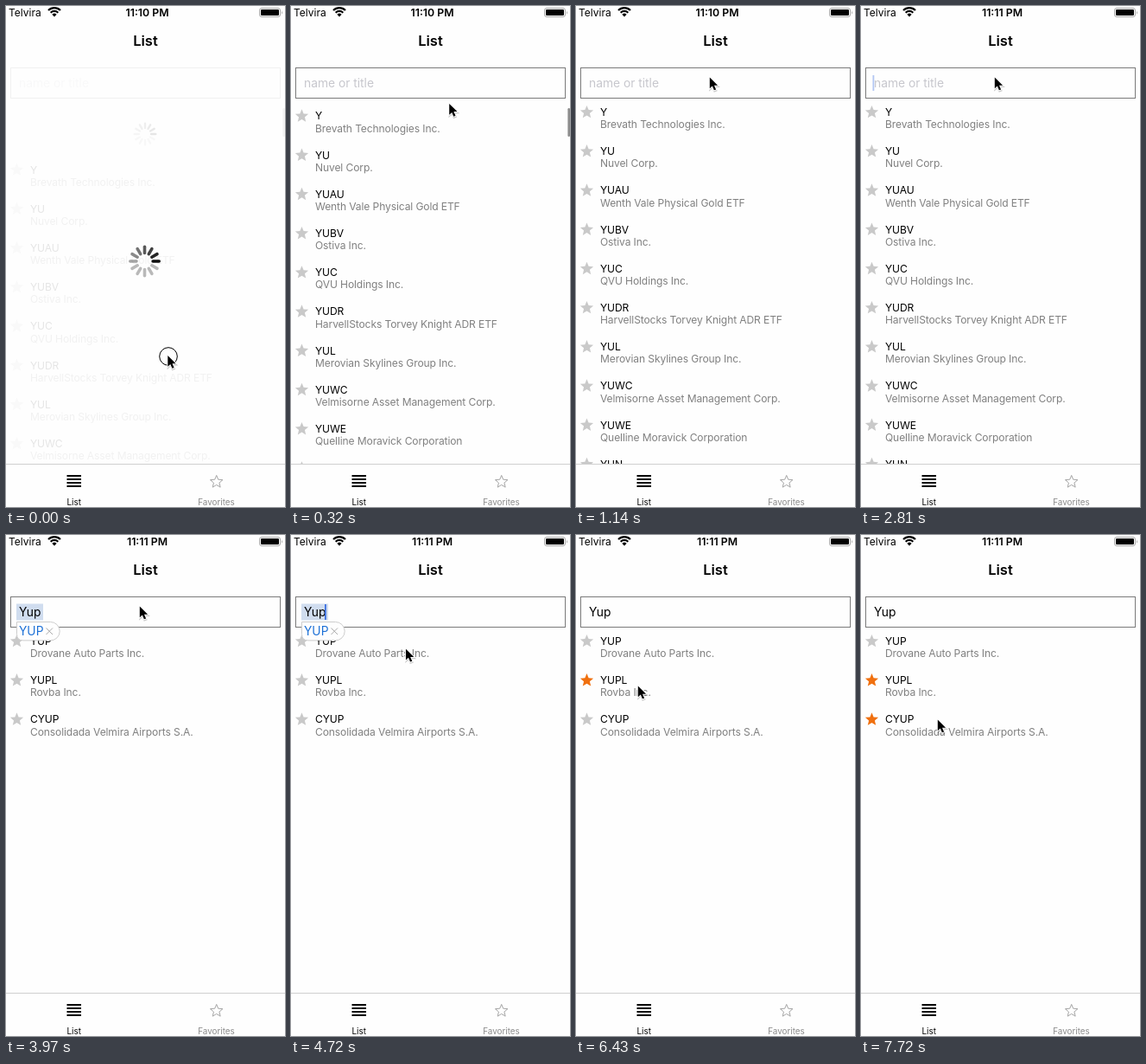
These frames come from a looping animation (323 px wide and 579 px high, 8000 ms). An HTML page:

```html
<!DOCTYPE html>
<html lang="en">
<head>
<meta charset="utf-8">
<title>Stock list</title>
<style>
  html, body { margin: 0; width: 100%; height: 100%; overflow: hidden; background: #fefefe; }
  svg { display: block; width: 100%; height: 100%; }
  text { font-family: Inter, "Noto Sans", sans-serif; white-space: pre; }
  .row { font-size: 12.06px; letter-spacing: -.1px; }
  .input { font-size: 13.8px; }
  .tab { font-size: 9.9px; text-anchor: middle; }
  .status { font-size: 12px; }
  .clock { font-size: 12.3px; font-weight: 600; text-anchor: middle; }
  .title { font-size: 16.5px; font-weight: 600; text-anchor: middle; }
</style>
</head>
<body>
<svg id="stage" viewBox="0 0 323 579"></svg>
<script>
const LOOP = 8000;
const ROW_STEP = 45.2;
const ALL = [
  ['Y', 'Brevath Technologies Inc.'],
  ['YU', 'Nuvel Corp.'],
  ['YUAU', 'Wenth Vale Physical Gold ETF'],
  ['YUBV', 'Ostiva Inc.'],
  ['YUC', 'QVU Holdings Inc.'],
  ['YUDR', 'HarvellStocks Torvey Knight ADR ETF'],
  ['YUL', 'Merovian Skylines Group Inc.'],
  ['YUWC', 'Velmisorne Asset Management Corp.'],
  ['YUWE', 'Quelline Moravick Corporation'],
  ['YUN', 'Tolverine Inc.']
];
const FOUND = [
  ['YUP', 'Drovane Auto Parts Inc.'],
  ['YUPL', 'Rovba Inc.'],
  ['CYUP', 'Consolidada Velmira Airports S.A.']
];

// [time, x, y] of the pointer tip
const POINTER = [
  [0, 187, 404], [60, 187, 404], [320, 183, 113], [640, 154.5, 79.5], [1020, 154.5, 79.5],
  [1140, 154.5, 82.5], [4380, 154.5, 82.5], [5020, 113.5, 175], [5680, 113.5, 175],
  [5740, 100.5, 176.5], [5880, 71.5, 174.5], [6670, 71.5, 174.5], [6890, 88.5, 213.5],
  [LOOP, 88.5, 213.5]
];
const TOUCHES = [[0, 60], [2100, 2220], [5140, 5200], [5960, 6130], [7250, 7420]];
const LOADING = [[0, 60], [6130, 6430], [7420, 7720]];
const FAVORITED_AT = [Infinity, 6430, 7720];
const PRESSED = [null, [5960, 6130], [7250, 7420]];
// [time, opacity] of the text caret
const CARET = [
  [0, 0], [2159, 0], [2160, 1], [2720, 1], [2870, 0], [3039, 0], [3040, 1],
  [3820, 1], [3970, 0], [4230, 0], [4380, 1], [4760, 1], [4900, 0], [LOOP, 0]
];

const within = (t, span) => t >= span[0] && t < span[1];
const during = (t, spans) => spans.some(span => within(t, span));

function track(keys, t) {
  const i = Math.max(1, keys.findIndex(key => key[0] > t));
  const a = keys[i - 1], b = keys[i];
  const p = (t - a[0]) / (b[0] - a[0]);
  return a.slice(1).map((v, k) => v + (b[k + 1] - v) * p);
}

const text = (x, y, content, style, fill = '#000') =>
  `<text x="${x}" y="${y}" class="${style}" fill="${fill}">${content}</text>`;

const rect = (x, y, w, h, extra = '') =>
  `<rect x="${x}" y="${y}" width="${w}" height="${h}" ${extra}/>`;

const group = (opacity, content) => `<g opacity="${opacity}">${content}</g>`;

function star(cx, cy, r, paint) {
  const points = Array.from({ length: 10 }, (_, i) => {
    const a = i * Math.PI / 5 - Math.PI / 2, d = i % 2 ? r * .45 : r;
    return `${(cx + d * Math.cos(a)).toFixed(2)},${(cy + d * Math.sin(a)).toFixed(2)}`;
  });
  return `<polygon points="${points.join(' ')}" stroke-linejoin="round" ${paint}/>`;
}

function spinner(cx, cy, r, width, t) {
  const head = Math.floor(t / 1000 * 12);
  let spokes = '';
  for (let k = 0; k < 12; k++) {
    spokes += `<path d="M${r * .52} 0H${r - width / 2}" transform="rotate(${(head - k) * 30})"
      opacity="${Math.max(.27, .95 - k * .1)}"/>`;
  }
  return `<g transform="translate(${cx} ${cy})" stroke="#000" stroke-width="${width}"
    stroke-linecap="round">${spokes}</g>`;
}

function statusBar(t) {
  const wifi = [10, 6.2].map(r => {
    const d = r * .7;
    return `<path d="M${56 - d} ${12 - d}A${r} ${r} 0 0 1 ${56 + d} ${12 - d}"/>`;
  }).join('');
  return text(3, 12, 'Telvira', 'status') +
    `<g fill="none" stroke="#000" stroke-width="2.1">${wifi}</g>` +
    '<path d="M56 12.6L53.4 9.7A3.8 3.8 0 0 1 58.6 9.7Z"/>' +
    text(163.5, 12, t < 2160 ? '11:10 PM' : '11:11 PM', 'clock') +
    rect(293.5, 2.5, 24, 10, 'rx="2.5" fill="none" stroke="#a8a8a8"') +
    rect(295, 4, 21, 7, 'rx="1.2"') +
    '<path d="M319 5.5q1.8 2 0 4z" fill="#a8a8a8"/>' +
    text(161.5, 46.2, 'List', 'title');
}

function tabBar() {
  const bars = [0, 1, 2, 3].map(i => rect(70.5, 542 + i * 4, 16.5, 2)).join('');
  return rect(0, 529, 323, 50, 'fill="#fefefe"') + rect(0, 529, 323, 1, 'fill="#cfcfcf"') +
    bars + text(78.7, 576.5, 'List', 'tab') +
    star(243.7, 550, 7.6, 'fill="none" stroke="#a6a6a6"') +
    text(243.5, 576.5, 'Favorites', 'tab', '#8a8a8a');
}

function searchBox(t) {
  const typed = 'Yup'.slice(0, t < 3040 ? 0 : t < 3220 ? 1 : t < 3330 ? 2 : 3);
  const caretX = [14.5, 24.5, 32.5, 40][typed.length];
  const marked = within(t, [3560, 5200]);
  return (marked ? rect(12, 79.5, 31, 19, 'fill="#d0ddef"') : '') +
    rect(5.5, 71.5, 312, 35, 'fill="none" stroke="#7a7a7a"') +
    (typed ? text(15, 94, typed, 'input') : text(15, 94, 'name or title', 'input', '#c7c7cd')) +
    group(t < 5200 ? track(CARET, t)[0] : 0, rect(caretX - 1, 80, 1.8, 18, 'fill="#3b6fe0"'));
}

function list(t) {
  const pull = 66.5 * Math.max(0, 1 - Math.max(0, t - 60) / 439) ** 3;
  const filtered = t >= 3510;
  const rows = (filtered ? FOUND : ALL).map(([code, name], i) => {
    const y = 122.5 + pull + i * ROW_STEP;
    const gold = filtered && t >= FAVORITED_AT[i];
    const pressed = filtered && PRESSED[i] && within(t, PRESSED[i]);
    return group(pressed ? .2 : 1,
      star(12.5, y + .4, 8, `fill="${gold ? '#f0700f' : '#c9c9c9'}"`) +
      text(28, y + 4.5, code, 'row') + text(28, y + 18.7, name, 'row', '#808080'));
  }).join('');
  const refresh = pull > 1
    ? group(pull / 66.5, spinner(161, 81.5 + pull, 13.5, 2.4, 0)) : '';
  const bar = Math.max(0, Math.min(1, (840 - t) / 300));
  return `<g clip-path="url(#listArea)">${refresh}${rows}` +
    group(bar, rect(320.4, 118, 2.6, 33, 'rx="1.3" fill="#8c8c8c"')) + '</g>';
}

const suggestion = () =>
  `<path d="M12.5 100.5H51.5a10.7 10.7 0 0 1 0 21.4H20q-7.5 0-7.5-7.5z"
    fill="#fefefe" stroke="#cdcdcd"/>` +
  text(15, 116, 'YUP', 'input', '#1c70d6') +
  '<path d="M46.5 107.5l7.5 7.5m0-7.5l-7.5 7.5" stroke="#aaa"/>';

function pointer(t) {
  const [x, y] = track(POINTER, t);
  const arrow = 'M.3 0V12.8l3-2.8 2.1 4.8 2.2-.9-2.1-4.7H9.6z';
  const ring = during(t, TOUCHES)
    ? '<circle cx="1" cy="1" r="10.3" fill="none" stroke="#000"/>' : '';
  return `<g transform="translate(${x} ${y})">${ring}
    <path d="${arrow}" transform="translate(.3 1.2)" opacity=".2" stroke="#000" stroke-width="2"/>
    <path d="${arrow}" stroke="#fff" stroke-width="1.8" paint-order="stroke"/></g>`;
}

function scene(t) {
  const loading = during(t, LOADING);
  return '<clipPath id="listArea"><path d="M0 108H323V529H0z"/></clipPath>' +
    rect(0, 0, 323, 579, 'fill="#fefefe"') +
    statusBar(t) +
    group(loading ? .1 : 1, searchBox(t) + list(t)) +
    (within(t, [3560, 5200]) ? suggestion() : '') +
    tabBar() +
    (loading ? spinner(160.5, 295, 18.5, 3.6, t) : '') +
    pointer(t);
}

const stage = document.getElementById('stage');
const start = performance.now();
function draw() {
  stage.innerHTML = scene((performance.now() - start) % LOOP);
  requestAnimationFrame(draw);
}
draw();
</script>
</body>
</html>
```
